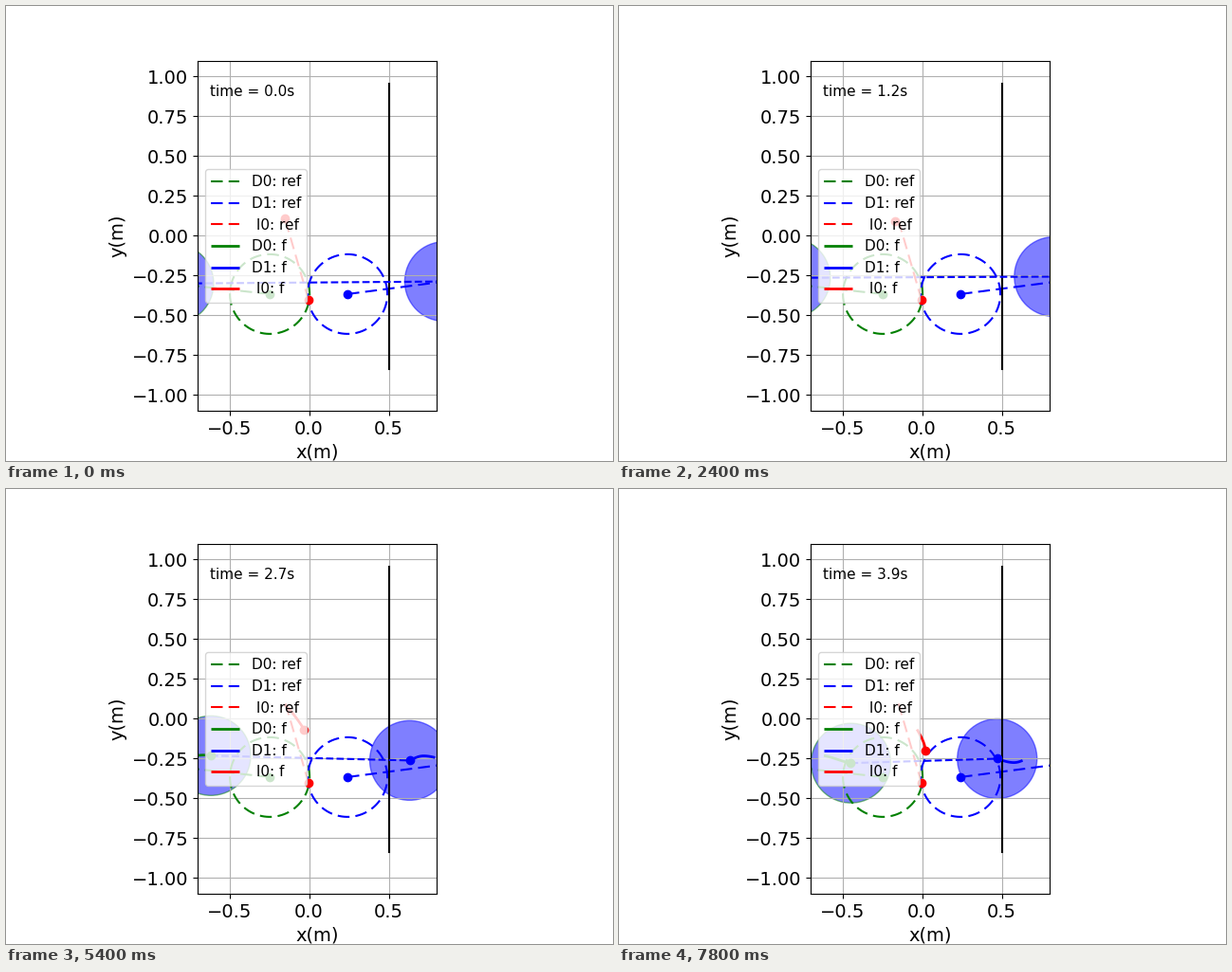
These frames come from a looping animation (640x480 px, 8000 ms). A matplotlib script:

```python
import numpy as np
import matplotlib.pyplot as plt
from matplotlib.animation import FuncAnimation
from matplotlib.patches import Circle

FRAMES, DT, TRAIL = 40, 0.1, 12
RADIUS = 0.25
DASH = (0, (6, 3))
COLORS = {"D0": "g", "D1": "b", "I0": "r"}
LABELS = {"D0": "D0", "D1": "D1", "I0": " I0"}
GOALS = {"D0": (-0.247, -0.366), "D1": (0.241, -0.366), "I0": (-0.003, -0.405)}


def ease(t, *keys):
    """Cosine easing through (time, value) turning points."""
    at, val = zip(*keys)
    k = np.interp(t, at, range(len(at)))
    i = np.floor(k)
    return np.interp(i + (1 - np.cos(np.pi * (k - i))) / 2, range(len(val)), val)


def ramp(t, start, softness=0.08):
    """Zero before start, then unit speed, with a rounded corner."""
    return softness * np.logaddexp(0, (t - start) / softness)


t = np.arange(FRAMES) * DT
travel = ramp(t, 1.05)
paths = {
    "D0": np.array([-0.849 + 0.141 * travel,
                    ease(t, (0, -0.300), (2.4, -0.228), (4.2, -0.282))]),
    "D1": np.array([0.850 - 0.133 * travel,
                    ease(t, (0.2, -0.287), (2.05, -0.233), (3.1, -0.275), (4.5, -0.235))]),
    "I0": np.array([ease(t, (0, -0.152), (1, -0.170), (3.6, 0.018)),
                    ease(t, (0, 0.110), (0.8, 0.074), (1.25, 0.092), (4, -0.200))]),
}

fig, ax = plt.subplots(figsize=(6.4, 4.8), dpi=100)
ax.set_aspect("equal")
ax.set_xlim(-0.7, 0.8)
ax.set_ylim(-1.1, 1.1)
ax.tick_params(labelsize=14)
ax.set_xlabel("x(m)", fontsize=14)
ax.set_ylabel("y(m)", fontsize=14)
ax.grid(True)

for k, goal in GOALS.items():
    start = paths[k][:, 0]
    ax.plot([goal[0], start[0]], [goal[1], start[1]], color=COLORS[k],
            ls=DASH, lw=1.5, label=f"{LABELS[k]}: ref")
trails = {k: ax.plot([], [], color=COLORS[k], lw=2, solid_capstyle="butt",
                     label=f"{LABELS[k]}: f")[0] for k in GOALS}

angle = np.linspace(0, 2 * np.pi, 100)
discs = {}
for k in ("D0", "D1"):
    x, y = GOALS[k]
    ax.plot(x + RADIUS * np.cos(angle), y + RADIUS * np.sin(angle),
            color=COLORS[k], ls=DASH, lw=1.5)
    discs[k] = ax.add_patch(Circle((0, 0), RADIUS, fc="b", ec=COLORS[k], alpha=0.5))

ax.plot([0.5, 0.5], [-0.835, 0.955], color="k", lw=1.5)
link, = ax.plot([], [], "b--", lw=1.5)
for k, goal in GOALS.items():
    ax.plot(*goal, "o", color=COLORS[k])
dots = {k: ax.plot([], [], "o", color=COLORS[k])[0] for k in GOALS}

clock = ax.text(0.05, 0.9, "", transform=ax.transAxes, fontsize=11)
ax.legend(loc="center left", fontsize=11)


def update(n):
    for k, path in paths.items():
        trails[k].set_data(path[:, max(0, n - TRAIL):n + 1])
        dots[k].set_data(path[:, n:n + 1])
    for k, disc in discs.items():
        disc.center = tuple(paths[k][:, n])
    link.set_data(*np.column_stack([paths["D0"][:, n], paths["D1"][:, n]]))
    clock.set_text(f"time = {n * DT:.1f}s")
    return [*trails.values(), *dots.values(), *discs.values(), link, clock]


anim = FuncAnimation(fig, update, frames=FRAMES, interval=200, repeat=True,
                     repeat_delay=0)
plt.show()
```
